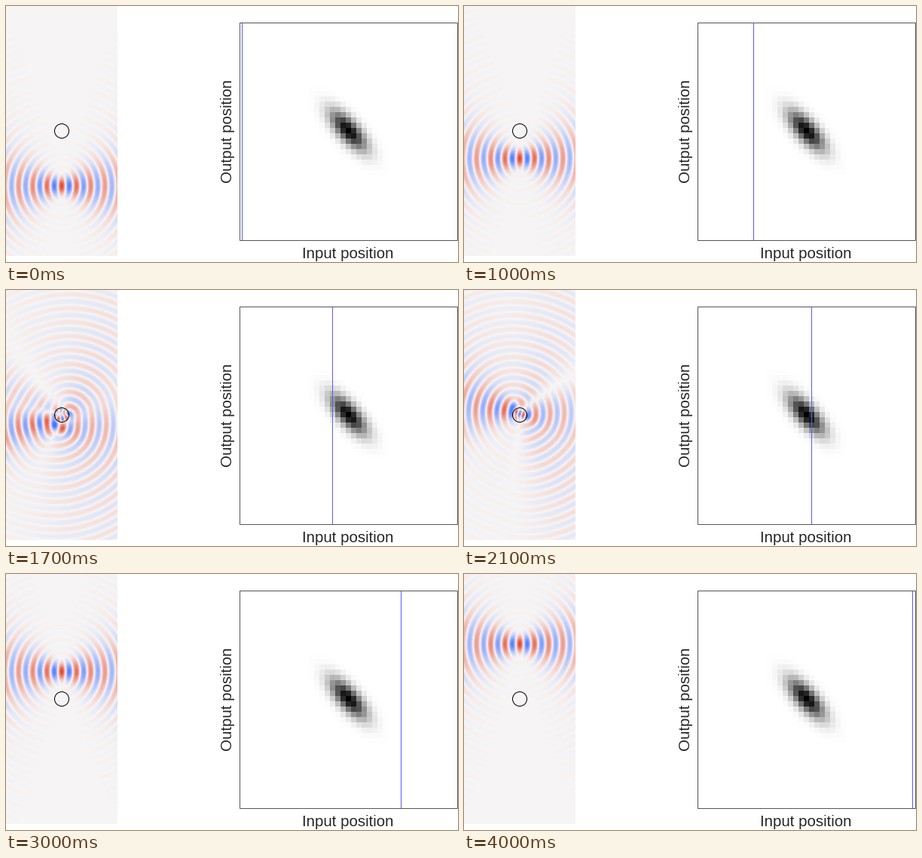
These frames come from a looping animation (600x340 px, 4100 ms). A matplotlib script:

```python
import numpy as np
import matplotlib.pyplot as plt
from matplotlib.animation import FuncAnimation
from matplotlib.colors import LinearSegmentedColormap
from matplotlib.patches import Circle, Rectangle

W, H, DPI = 600, 340, 100
STEPS = 41
PX = 72 / DPI

# Wave panel, in pixels
PW, PH = 148, 332
CX, CY = 74, 166
WAVELENGTH = 18.5
K = 2 * np.pi / WAVELENGTH
WAIST = 9.5
RADIUS = 9.25
INDEX = 2.0
FOCUS_STEP = 3.65

# Matrix panel, in pixels
LEFT, TOP, SIDE = 309.5, 21.5, 289
CELL = SIDE / STEPS


def integrate(f, t):
    return ((f[:, 1:] + f[:, :-1]) * np.diff(t) / 2).sum(axis=1)


def bessel_j(n, x):
    t = np.linspace(0, np.pi, 400)
    return integrate(np.cos(n * t - np.outer(x, np.sin(t))), t) / np.pi


def bessel_y(n, x):
    t = np.linspace(0, np.pi, 400)
    s = np.linspace(0, 6, 500)
    wave = integrate(np.sin(np.outer(x, np.sin(t)) - n * t), t)
    sign = -1 if n % 2 else 1
    growth = np.exp(n * s) + sign * np.exp(-n * s)
    return (wave - integrate(growth * np.exp(-np.outer(x, np.sinh(s))), s)) / np.pi


def hankel(n, x):
    return bessel_j(n, x) + 1j * bessel_y(n, x)


def slope(f, n, x):
    return (f(n - 1, x) - f(n + 1, x)) / 2


def cylinder_coefficients(n):
    """Scattered and inner amplitudes of one cylindrical wave."""
    x = np.array([K * RADIUS])
    j, dj = bessel_j(n, x), slope(bessel_j, n, x)
    h, dh = hankel(n, x), slope(hankel, n, x)
    ji, dji = bessel_j(n, INDEX * x), INDEX * slope(bessel_j, n, INDEX * x)
    a = (dji * j - dj * ji) / (dh * ji - dji * h)
    return a[0], ((j + a * h) / ji)[0]


xs = np.arange(PW) + 0.5 - CX
ys = np.arange(PH) + 0.5 - CY
gx, gy = np.meshgrid(xs, ys)
r, theta = np.hypot(gx, gy), np.arctan2(gy, gx)
inside = r < RADIUS

# The beam as a fan of plane waves
phi = np.linspace(-1.45, 1.45, 241)
weight = np.exp(-(K * WAIST * np.sin(phi) / 2) ** 2) * np.cos(phi)
weight /= weight.sum()
along = np.exp(1j * K * np.outer(np.cos(phi), xs))
across = np.exp(1j * K * np.outer(ys, np.sin(phi)))

# Cylindrical waves of the scatterer
orders = np.arange(-7, 8)
r_out = np.linspace(RADIUS, r.max(), 1200)
r_in = np.linspace(0, RADIUS, 80)
modes = []
for n in orders:
    a, d = cylinder_coefficients(n)
    outer = np.interp(r, r_out, a * hankel(n, K * r_out))
    inner = np.interp(r, r_in, d * bessel_j(n, INDEX * K * r_in))
    modes.append(np.where(inside, inner, outer) * np.exp(1j * n * theta))
modes = np.array(modes)
to_modes = np.exp(1j * orders[:, None] * (np.pi / 2 - phi))


def field(i):
    offset = (STEPS // 2 - i) * FOCUS_STEP
    beam = weight * np.exp(-1j * K * offset * np.sin(phi))
    incident = (across * beam) @ along
    scattered = np.tensordot(to_modes @ beam, modes, axes=1)
    return np.real(np.where(inside, 0, incident) + scattered)


def matrix():
    sx, sy, rho = 2.35, 2.55, 0.72
    q = np.arange(STEPS) - STEPS // 2
    u, v = np.meshgrid(q / sx, q / sy)
    return np.exp(-(u**2 + v**2 - 2 * rho * u * v) / (2 * (1 - rho**2)))


def rgb(*c):
    return tuple(v / 255 for v in c)


def line_color(i):
    if i % 21 == 14:
        return rgb(85, 85, 150) if i < 21 else rgb(95, 95, 95)
    return rgb(90, 90, 250)


plt.rcParams["font.family"] = "Liberation Sans"
fig = plt.figure(figsize=(W / DPI, H / DPI), dpi=DPI, facecolor="white")
ax = fig.add_axes([0, 0, 1, 1])

wave_map = LinearSegmentedColormap.from_list(
    "wave", [rgb(70, 115, 255), rgb(247, 245, 245), rgb(228, 70, 45)])
wave = ax.imshow(field(0), cmap=wave_map, vmin=-1, vmax=1,
                 extent=(0, PW, PH, 0), interpolation="nearest")
ax.add_patch(Circle((CX, CY), 9.5, fill=False, ec="black", lw=PX))

ax.imshow(matrix(), cmap="gray_r", vmin=0, vmax=1, interpolation="nearest",
          extent=(LEFT, LEFT + SIDE, TOP + SIDE, TOP))
marker, = ax.plot([], [], lw=PX, solid_capstyle="butt", zorder=3)
ax.add_patch(Rectangle((LEFT, TOP), SIDE, SIDE, fill=False,
                       ec=rgb(85, 85, 85), lw=PX, zorder=4))

label = dict(fontsize=20.5 * PX, color=rgb(38, 38, 38), ha="center", va="baseline")
ax.text(453.7, 335, "Input position", **label)
ax.text(299.5, 166, "Output position", rotation=90, rotation_mode="anchor", **label)

ax.set_xlim(0, W)
ax.set_ylim(H, 0)
ax.set_aspect("auto")
ax.axis("off")


def draw(i):
    wave.set_data(field(i))
    x = LEFT + (i + 0.5) * CELL
    marker.set_data([x, x], [TOP, TOP + SIDE])
    marker.set_color(line_color(i))
    return wave, marker


anim = FuncAnimation(fig, draw, frames=STEPS, interval=100, repeat=True,
                     repeat_delay=0, blit=False)
plt.show()
```
